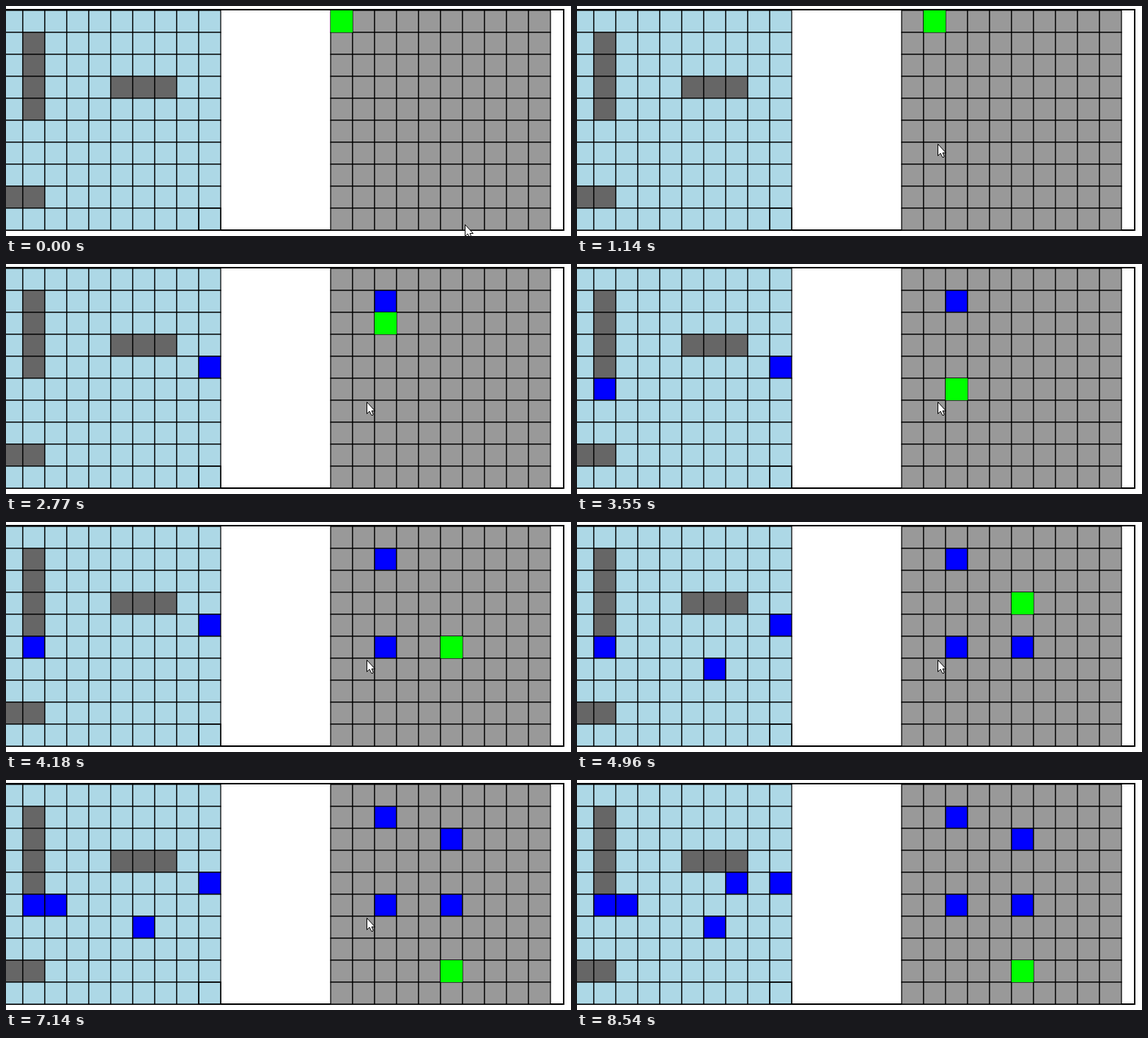
An HTML page with a canvas for the animation above (8770 ms loop, 771x314 px).

```html
<!DOCTYPE html>
<html lang="en">
<head>
<meta charset="utf-8">
<title>Two boards</title>
<style>
  html, body { margin: 0; width: 771px; height: 314px; overflow: hidden; background: #fff; }
  canvas { display: block; }
</style>
</head>
<body>
<canvas id="stage" width="771" height="314"></canvas>
<script>
const ctx = document.getElementById('stage').getContext('2d');
const LOOP = 8770, CELL = 30, SIZE = 10, TOP = 6, LINE = 1.25;
const LEFT_X = -7, RIGHT_X = 443;
const HOME = { x: 492, y: 188 };
const arrow = new Path2D('M.5 .5V16.5L4 13L6.8 18.5H8.5L9 17L7 12.5H11.5Z');

const STEP = { R: [1, 0], D: [0, 1], U: [0, -1] };

// Bursts of key presses; F fires and draws the opponent's reply.
const bursts = [
  { at: 1140, every: 460, keys: 'RR' },
  { at: 2170, every: 220, keys: 'DF', reply: '9,4' },
  { at: 2770, every: 195, keys: 'DDDDF', reply: '1,5' },
  { at: 3800, every: 173, keys: 'RRRF', reply: '6,6' },
  { at: 4790, every: 156, keys: 'UUUF', reply: '2,5' },
  { at: 6210, every: 186, keys: 'DDDDDD' },
  { at: 7460, every: 0, keys: 'F', reply: '7,4' }
];

const ship = (col, row, length, [dx, dy]) =>
  Array.from({ length }, (_, i) => `${col + i * dx},${row + i * dy}`);
const ships = new Set([
  ...ship(1, 1, 4, STEP.D), ...ship(5, 3, 3, STEP.R), ...ship(0, 8, 2, STEP.R)
]);

function gameAt(t) {
  const game = { col: 0, row: 0, hits: new Set(), replies: new Set() };
  for (const { at, every, keys, reply } of bursts) {
    [...keys].forEach((key, i) => {
      if (t < at + i * every) return;
      if (key === 'F') {
        game.hits.add(`${game.col},${game.row}`);
        game.replies.add(reply);
      } else {
        game.col += STEP[key][0];
        game.row += STEP[key][1];
      }
    });
  }
  return game;
}

// The pointer sweeps in, overshoots, rests, then speeds off the stage.
function pointerAt(t) {
  const offset = (dx, dy) => [Math.round(HOME.x + dx), Math.round(HOME.y + dy)];
  if (t < 280) {
    const left = 1 - Math.floor(t / 70) / 3;
    return offset(146 * left - 12, 122 * left - 12);
  }
  if (t < 8240) return offset(0, 0);
  const away = ((Math.floor((t - 8240) / 75) + 1) / 4) ** 1.5;
  return offset(222 * away, 118 * away);
}

function cellBox(x0, col, row) {
  return [x0 + col * CELL, TOP + row * CELL, CELL, CELL];
}

function drawBoard(x0, colorOf) {
  for (let col = 0; col < SIZE; col++) {
    for (let row = 0; row < SIZE; row++) {
      const box = cellBox(x0, col, row);
      ctx.fillStyle = colorOf(`${col},${row}`);
      ctx.fillRect(...box);
      ctx.strokeRect(...box);
    }
  }
}

function drawPointer(x, y) {
  ctx.save();
  ctx.translate(x, y);
  ctx.lineWidth = 1;
  ctx.fillStyle = '#fff';
  ctx.fill(arrow);
  ctx.stroke(arrow);
  ctx.restore();
}

function draw(t) {
  const { col, row, hits, replies } = gameAt(t);
  ctx.fillStyle = '#fff';
  ctx.fillRect(0, 0, 771, 314);
  ctx.strokeStyle = '#000';
  ctx.lineWidth = 2;
  ctx.strokeRect(-10, 5, 771, 301);

  ctx.lineWidth = LINE;
  drawBoard(LEFT_X, key => replies.has(key) ? '#00f' : ships.has(key) ? '#666' : '#add8e6');
  ctx.strokeRect(...cellBox(LEFT_X, SIZE - 1, SIZE - 1));
  drawBoard(RIGHT_X, key => hits.has(key) ? '#00f' : '#999');

  ctx.fillStyle = '#0f0';
  ctx.fillRect(...cellBox(RIGHT_X, col, row));
  drawPointer(...pointerAt(t));
}

const start = performance.now();
function tick() {
  draw((performance.now() - start) % LOOP);
  requestAnimationFrame(tick);
}
tick();
</script>
</body>
</html>
```
